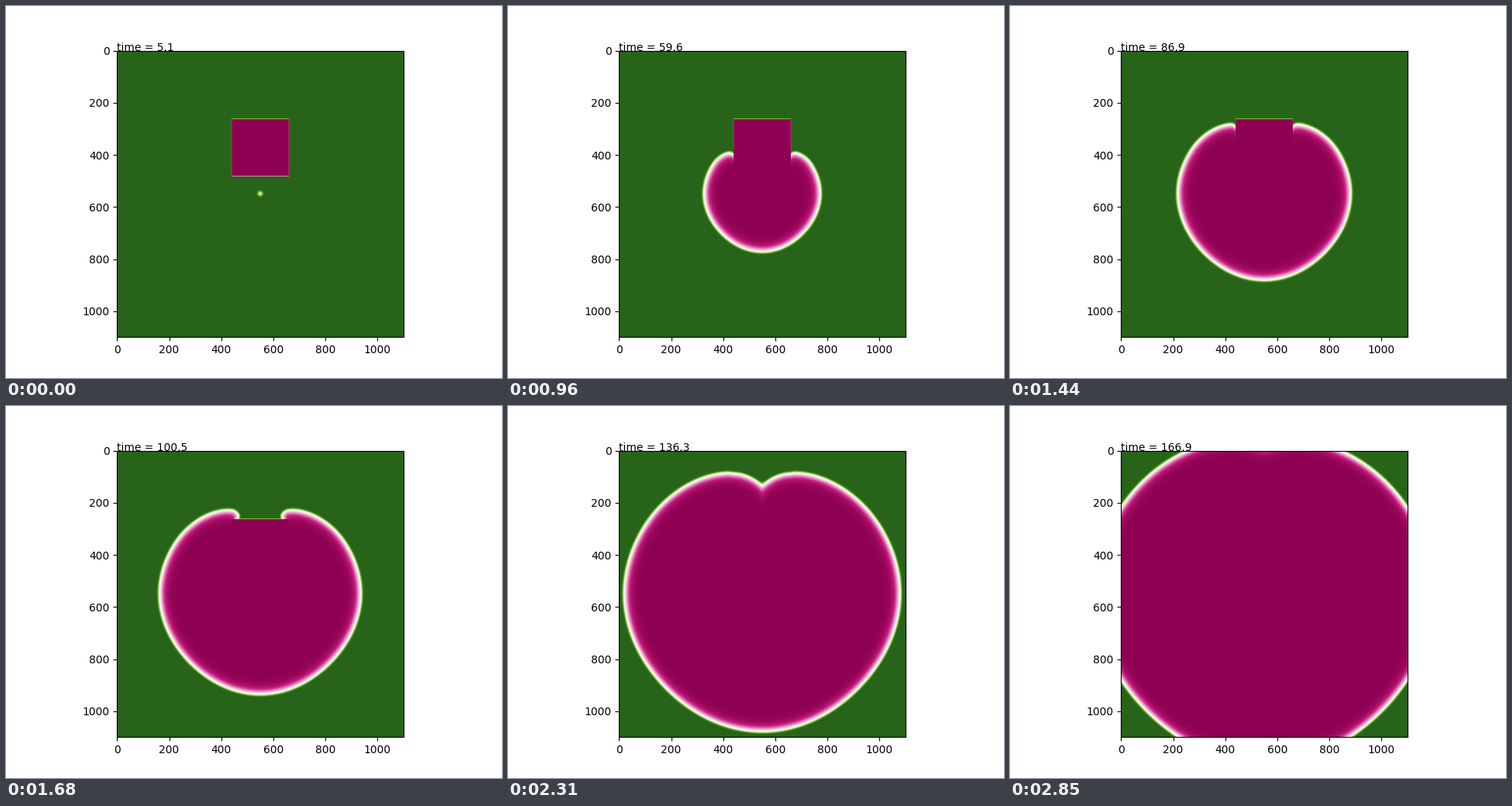
A matplotlib script for the animation above (3000 ms loop, 640 by 480 pixels).

```python
import numpy as np
import matplotlib.pyplot as plt
from matplotlib.animation import FuncAnimation

SIZE, STEP = 1100, 2
FRAMES, LAST, INTERVAL = 100, 95, 30
HALF = 110              # half side of the dead square
LOW, HIGH = -66, -286   # its lower and upper edge, seen from the centre
SPEED, DECAY = 3.99, 13.3


def norm(x, y):
    """Distance on a grid where waves run slower along the diagonals."""
    r2 = x * x + y * y + 1e-9
    return np.sqrt(r2) * (1 + 0.088 * x * x * y * y / r2**2)


def blunt(d):
    return np.sqrt(d * d + 64)


def path_length(x, y):
    """Shortest way from the centre, passing the square on its right side."""
    to_low = blunt(norm(HALF, LOW))
    direct = blunt(norm(x, y))
    around = to_low + norm(x - HALF, y - LOW)
    over = to_low + (LOW - HIGH) + norm(x - HALF, y - HIGH)

    # the wave lags after grazing the wall
    rise = np.maximum(HIGH - y, 0)
    rho = np.hypot(x - HALF, y - HIGH) + 1e-9
    around += 4 * np.exp(-np.maximum(x - HALF, 0) / 18) * (1 - np.exp(-rise / 40))
    over += (4 + 5 * (HALF - x) / rho) * (1 - np.exp(-rho / 40))

    visible = (y > LOW) | (x / HALF >= y / LOW)
    return np.where(visible, direct, np.where(x >= HALF, around, over))


def travel_map():
    axis = np.arange(STEP / 2, SIZE, STEP) - SIZE / 2
    x, y = np.meshgrid(axis, axis)
    near = path_length(np.abs(x), y)
    far = path_length(-np.abs(x), y)
    # both halves merge softly above the square
    k = 4 + 12 * np.clip((-420 - y) / 130, 0, 1)
    merged = near - k * np.log1p(np.exp(-np.maximum(far - near, 0) / k))
    d = np.where(y < HIGH, merged, near)

    dx = np.abs(x) - HALF
    dy = np.abs(y - (LOW + HIGH) / 2) - HALF
    wall = np.hypot(np.maximum(dx, 0), np.maximum(dy, 0))
    d += 12 * np.exp(-wall / 7)
    return d.astype(np.float32), (dx < 0) & (dy < 0)


travel, dead = travel_map()


def gate(t):
    s = SPEED * t - 6.2 - travel
    depth = 1.5 * np.logaddexp(0, s / 1.5)
    v = np.exp(-depth / DECAY)
    v[dead] = 0
    return v


def clock(i):
    return 1.7034 * (min(i, LAST) + 3)


fig, ax = plt.subplots(figsize=(6.4, 4.8), dpi=100)
edge = (-0.5, SIZE - 0.5, SIZE - 0.5, -0.5)
image = ax.imshow(gate(clock(0)), cmap="PiYG", vmin=0, vmax=1, extent=edge)
label = ax.text(0, 0, "")


def update(i):
    t = clock(i)
    image.set_data(gate(t))
    label.set_text(f"time = {t:.1f}")
    return image, label


anim = FuncAnimation(fig, update, frames=FRAMES, interval=INTERVAL,
                     repeat=True, repeat_delay=0)
plt.show()
```
